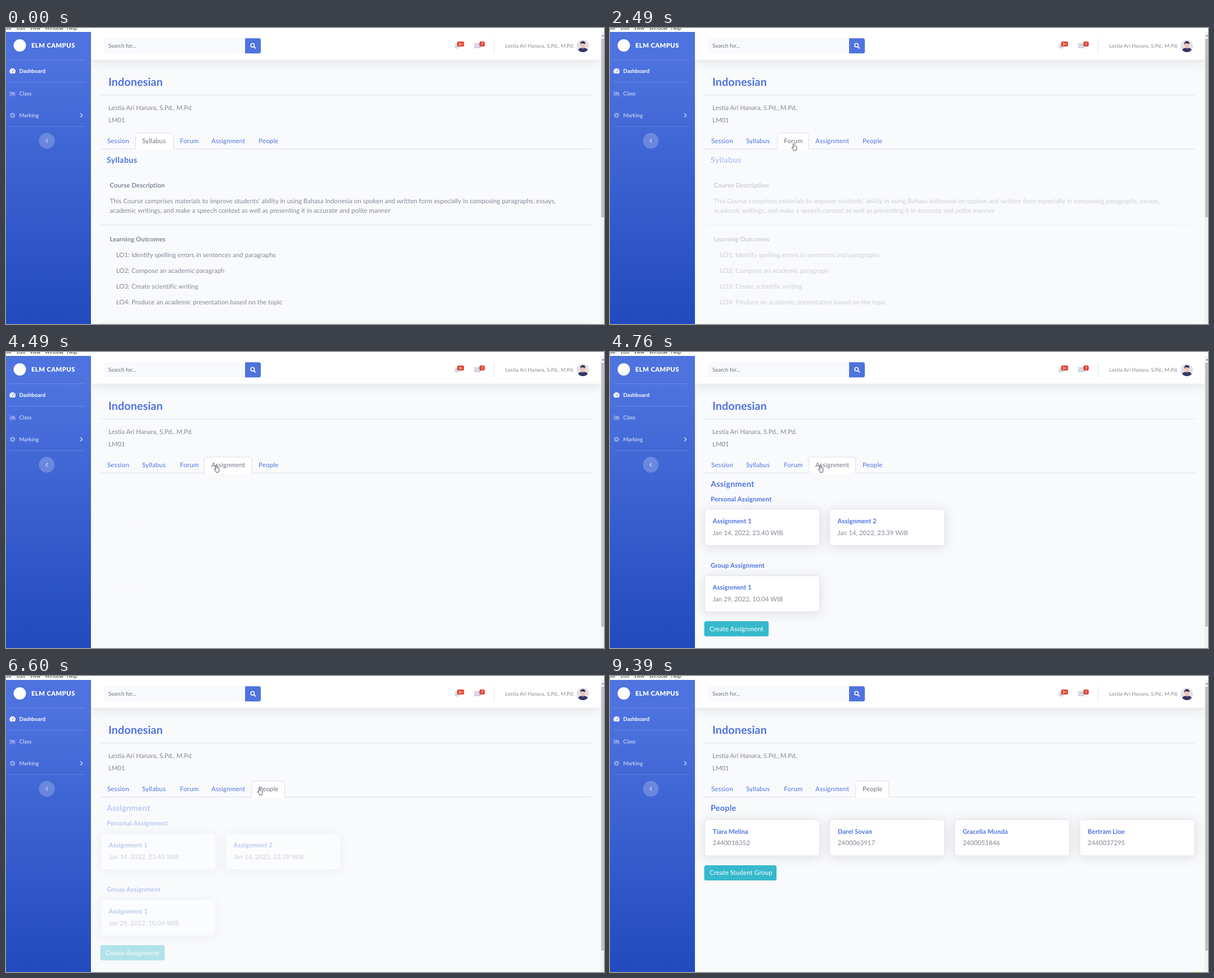
Write an HTML page that moves like this. It is 1063 by 527 pixels and loops after 9530 ms.

```html
<!DOCTYPE html>
<html lang="en">
<head>
<meta charset="utf-8">
<title>Course portal</title>
<style>
  html, body { margin: 0; width: 100%; height: 100%; overflow: hidden; background: #f9fafc; }
  svg { display: block; }
  text { font-family: Lato, "Open Sans", sans-serif; font-size: 11.4px; letter-spacing: .03px; fill: #858796; white-space: pre; text-rendering: geometricPrecision; }
  .bold { font-weight: 700; }
  .blue { fill: #4e73df; }
  .white { fill: #fff; letter-spacing: .1px; }
  .title { font-size: 19.7px; font-weight: 700; letter-spacing: .1px; }
  .head { font-size: 14.2px; font-weight: 700; letter-spacing: .35px; }
  .sub { font-weight: 700; letter-spacing: .15px; }
  .post { font-size: 14.2px; letter-spacing: .2px; }
  .small { font-size: 9.1px; letter-spacing: .1px; }
  .nav { font-size: 9.6px; fill: #fff; }
  .brand { font-size: 11.2px; font-weight: 900; letter-spacing: .45px; fill: #fff; }
  .search { font-size: 9.6px; fill: #6e707e; letter-spacing: 0; }
  .badge { font-size: 6.4px; font-weight: 700; fill: #fff; text-anchor: middle; }
  .menu { font-family: "Open Sans", sans-serif; font-size: 8.6px; fill: #222; letter-spacing: 0; }
  .tab { letter-spacing: .2px; fill: #4e73df; }
  .raised { filter: drop-shadow(0 2px 10px rgba(58, 59, 69, .15)); }
</style>
</head>
<body>
<svg id="stage" width="1063" height="527" viewBox="0 0 1063 527"></svg>
<script>
const teacher = 'Lestia Ari Hanara, S.Pd., M.Pd.';
const student = 'Tiara Melina';

const text = (x, y, str, cls = '') => `<text x="${x}" y="${y}" class="${cls}">${str}</text>`;
const rect = (x, y, w, h, fill, rx = 0, more = '') =>
  `<rect x="${x}" y="${y}" width="${w}" height="${h}" fill="${fill}" rx="${rx}" ${more}/>`;
const circle = (x, y, r, fill, more = '') => `<circle cx="${x}" cy="${y}" r="${r}" fill="${fill}" ${more}/>`;
const path = (d, fill, more = '') => `<path d="${d}" fill="${fill}" ${more}/>`;
const rule = (y, color = '#e3e4e8') => rect(168, y, 872, 1, color);
const stroke = (color, w) => `stroke="${color}" stroke-width="${w}" stroke-linecap="round" stroke-linejoin="round"`;

const button = (y, w, label) => rect(167.5, y, w, 27, '#36b9cc', 3.5) + text(177, y + 17.3, label, 'white');
const card = (x, y, title, sub) =>
  rect(x + .5, y + .5, 204, 64, '#fff', 4, 'stroke="#e3e6f0" class="raised"') +
  text(x + 14.5, y + 25, title, 'bold blue') + text(x + 14.5, y + 45.8, sub);
const post = (x, title, author, date) =>
  rect(x + .5, 293.5, 201, 85.5, '#fff', 4, 'stroke="#e3e6f0"') +
  text(x + 14.7, 321, title, 'post') + text(x + 14.7, 339.5, author) + text(x + 14.7, 360, date);

const tabs = [
  ['Session', 180, 168, 230.5],
  ['Syllabus', 242, 230.5, 297.5],
  ['Forum', 309.3, 297.5, 352.8],
  ['Assignment', 365, 352.8, 436.7],
  ['People', 449, 436.7, 495.5]
];

const outcomes = [
  'Identify spelling errors in sentences and paragraphs',
  'Compose an academic paragraph',
  'Create scientific writing',
  'Produce an academic presentation based on the topic'
];

const panels = [
  text(179, 240, 'Syllabus', 'head blue') +
  text(184.5, 284, 'Course Description', 'bold') +
  text(184.5, 312, 'This Course comprises materials to improve students’ ability in using Bahasa Indonesia on spoken and written form especially in composing paragraphs, essays,') +
  text(184.5, 329, 'academic writings, and make a speech context as well as presenting it in accurate and polite manner') +
  rule(350) +
  text(184.5, 380, 'Learning Outcomes', 'bold') +
  outcomes.map((s, i) => text(195.8, 408 + 28 * i, `LO${i + 1}: ${s}`)).join('') +
  rule(524.5),

  text(179, 240, 'Forum', 'head blue') +
  button(255, 86.5, 'Create Forum') +
  post(168, 'Tugas yaaa', teacher, 'Fri Jan 07 2022, 6:06:16 PM') +
  post(369, 'Absensi', student, 'Fri Jan 07 2022, 5:53:27 PM'),

  text(179, 240, 'Assignment', 'head blue') +
  text(179, 265.5, 'Personal Assignment', 'sub blue') +
  card(168, 280, 'Assignment 1', 'Jan 14, 2022, 23.40 WIB') +
  card(390, 280, 'Assignment 2', 'Jan 14, 2022, 23.39 WIB') +
  text(179, 383.5, 'Group Assignment', 'sub blue') +
  card(168, 398, 'Assignment 1', 'Jan 29, 2022, 10.04 WIB') +
  button(479.3, 114.5, 'Create Assignment'),

  text(179, 240, 'People', 'head blue') +
  [[student, '2440018352'], ['Darel Sovan', '2400063917'], ['Gracelia Munda', '2400051846'], ['Bertram Lioe', '2440037295']]
    .map(([name, id], i) => card(168 + 222.2 * i, 255.5, name, id)).join('') +
  button(337, 128.5, 'Create Student Group')
];

const topbar =
  rect(151, 7, 906, 49.5, '#fff', 0, 'class="raised"') +
  rect(173.5, 18, 252, 27.3, '#f8f9fc', 4) + text(182, 35, 'Search for...', 'search') +
  path('M425 18.2h24.5a3.5 3.5 0 0 1 3.5 3.5v20a3.5 3.5 0 0 1-3.5 3.5h-24.5z', '#4e73df') +
  circle(438.2, 30.7, 3.2, 'none', 'stroke="#fff" stroke-width="1.6"') +
  path('M440.8 33.4l2.4 2.4', 'none', stroke('#fff', 1.9)) +
  path('M796.5 35.5q2-1.5 2-4.5a3.4 3.4 0 0 1 6.8 0q0 3 2 4.5zM800.3 36.2h3.2a1.6 1.6 0 0 1-3.2 0z', '#d1d3e2') +
  rect(832, 27, 12, 9, '#d1d3e2', 1.2) + path('M832 29.3l6 4 6-4', 'none', stroke('#fff', .8)) +
  rect(802, 24, 12.2, 9, '#dc4636', 2.5) + text(808.2, 31, '3+', 'badge') +
  rect(841.5, 24, 9.5, 9, '#dc4636', 2.5) + text(846.3, 31, '7', 'badge') +
  rect(867, 18, 1, 27, '#e3e6f0') +
  text(887.5, 35, teacher, 'small') +
  circle(1025.5, 32, 11, '#dfe0e8') +
  path('M1017 39q1.5-3.2 6-3.6h5q4.5.4 6 3.6a11 11 0 0 1-17 0z', '#35376a') +
  rect(1023.8, 32, 3.4, 4.5, '#f0a58f', 1.5) +
  `<ellipse cx="1025.5" cy="30" rx="3.7" ry="4.4" fill="#f9bfa9"/>` +
  path('M1021.2 30q-1-5.8 3.2-6.4 6.4-.6 5.4 6.4l-1-2.4q-3.4.2-5.2-1.2-1.6 1-2.4 3.6z', '#2b2a4c');

const sidebar =
  rect(0, 7, 151, 520, 'url(#side)') +
  circle(24.5, 31, 11, '#fff') + text(45, 35.2, 'ELM CAMPUS', 'brand') +
  [56, 96, 175].map(y => rect(6, y, 134, 1, 'rgba(255,255,255,.17)')).join('') +
  path('M7.6 81a5.5 5.5 0 1 1 8 0z', '#fff') +
  path('M11.6 79l2-4.5M8.2 77.5h.2M9.4 74.6h.2M15 77.5h.2', 'none', stroke('#4a6fdc', 1)) +
  text(23.5, 80.2, 'Dashboard', 'nav bold') +
  `<g opacity=".38">` +
  path('M7 112v8.5h10', 'none', stroke('#fff', 1.2)) +
  path('M8.5 119v-3.6l2.2-2.6 2 2 1.8-1.4 2 2.6v3z', '#fff') +
  circle(11.6, 155.5, 2.7, 'none', 'stroke="#fff" stroke-width="2.3"') +
  circle(11.6, 155.5, 4.3, 'none', 'stroke="#fff" stroke-width="1.6" stroke-dasharray="2.25"') +
  `</g><g opacity=".85">` + text(23.5, 120, 'Class', 'nav') + text(23.5, 159, 'Marking', 'nav') + `</g>` +
  path('M132.6 152.2l3 3.2-3 3.2', 'none', stroke('rgba(255,255,255,.75)', 1.4)) +
  circle(72.5, 200.8, 14, 'rgba(255,255,255,.22)') +
  path('M73.7 198l-2.6 2.8 2.6 2.8', 'none', stroke('rgba(255,255,255,.65)', 1.4));

const course =
  text(182, 102.7, 'Indonesian', 'title blue') + rule(119) +
  text(182, 146, teacher) + text(182, 168, 'LM01') +
  rule(215, '#dddfeb') +
  path('', '#fff', 'id="active" stroke="#dddfeb"') +
  tabs.map(([label, x]) => text(x, 205, label, 'tab')).join('');

const chrome =
  rect(0, 0, 1063, 7, '#fff') +
  [['File', -4], ['Edit', 19], ['View', 42.5], ['Window', 69.5], ['Help', 108]]
    .map(([label, x]) => text(x, 3.3, label, 'menu')).join('') +
  rect(1057, 7, 6, 520, '#f1f1f1') + path('M1058.8 15l2.4-3 2.4 3z', '#8a8a8a') +
  rect(1058, 19, 5, 318, '#c1c1c1', 0, 'id="thumb"');

const pointers =
  path('M3 7.6V1.6a1.1 1.1 0 0 1 2.2 0v3.6q1-.6 1.5.3 1-.4 1.4.5 1.3-.3 1.3 1v2.6q0 1.4-.9 2.6v1H3.8v-1L.8 8.6q-.6-1.3.5-1.6.7 0 1.7 1.2z',
    '#fff', `id="hand" ${stroke('#3a3a44', .9)}`) +
  path('M.4.4v10.2l2.4-2.2 1.5 3.5 1.6-.7-1.5-3.4h3.1z', '#fff', `id="arrow" ${stroke('#333', .8)}`);

const stage = document.getElementById('stage');
stage.innerHTML =
  `<defs><linearGradient id="side" x1="0" y1="0" x2="0" y2="1">
    <stop offset=".1" stop-color="#4e73df"/><stop offset="1" stop-color="#224abe"/></linearGradient></defs>` +
  rect(0, 0, 1063, 527, '#f9fafc') + topbar + course +
  panels.map(p => `<g class="panel">${p}</g>`).join('') +
  sidebar + chrome + pointers +
  circle(1044, 534.4, 8.5, '#f4f000', 'id="ring" opacity=".7"');

const $ = id => document.getElementById(id);
const panelEls = [...document.querySelectorAll('.panel')];
const tabEls = [...document.querySelectorAll('.tab')];

const loop = 9530;
const clicks = [2430, 4360, 6540];

// time, x, y, eased arrival
const moves = [
  [1040, 936, 504], [1960, 339, 222, 1], [2030, 332, 212], [2290, 322.5, 205],
  [3499, 322.5, 205], [3500, 329.5, 204.5], [3900, 369.5, 201],
  [5749, 369.5, 201], [5750, 376, 200.5], [6010, 448, 198],
  [6209, 448, 198], [6350, 446.5, 198.5],
  [7929, 446.5, 198.5], [7930, 454.5, 199], [8860, 1041, 518, 1], [8930, 1042, 522], [9000, 1042, 530]
];

const clamp = v => Math.min(1, Math.max(0, v));
const show = (el, on) => el.setAttribute('visibility', on ? 'visible' : 'hidden');

function pointerAt(t) {
  const i = moves.findIndex(m => m[0] > t);
  if (i < 1) return moves[i < 0 ? moves.length - 1 : 0].slice(1, 3);
  const [a, b] = [moves[i - 1], moves[i]];
  let k = (t - a[0]) / (b[0] - a[0]);
  if (b[3]) k = k * k * (3 - 2 * k);
  return [1, 2].map(n => a[n] + (b[n] - a[n]) * k);
}

function draw(t) {
  // Fade the old panel out, then the new one in
  let panel = 0, alpha = 1;
  clicks.forEach((c, i) => {
    const d = t - c;
    if (d < -34) return;
    panel = d < 130 ? i : i + 1;
    alpha = d < 130 ? clamp(1 - (d + 34) / 150) : clamp((d - 130) / 180);
  });
  panelEls.forEach((el, i) => {
    show(el, i === panel);
    el.setAttribute('opacity', alpha);
  });
  $('thumb').setAttribute('height', panel ? 470 : 318);

  const [x, y] = pointerAt(t);
  const live = t >= 1040 && t < 9000;
  const onTab = y < 214;
  for (const [id, on] of [['hand', onTab], ['arrow', !onTab]]) {
    show($(id), live && on);
    $(id).setAttribute('transform', `translate(${x} ${y})`);
  }

  const active = 1 + clicks.filter(c => t >= c).length;
  const [, , left, right] = tabs[active];
  $('active').setAttribute('d', `M${left} 216V190.5q0-3.5 3.5-3.5H${right - 3.5}q3.5 0 3.5 3.5V216`);
  tabEls.forEach((el, i) => {
    const hover = live && onTab && x + 4 > tabs[i][2] && x + 4 < tabs[i][3];
    el.style.fill = i === active ? '#6e707e' : hover ? '#224abe' : '#4e73df';
  });
  show($('ring'), t >= 9390);
}

const start = performance.now();
function tick() {
  draw((performance.now() - start) % loop);
  requestAnimationFrame(tick);
}
tick();
</script>
</body>
</html>
```
